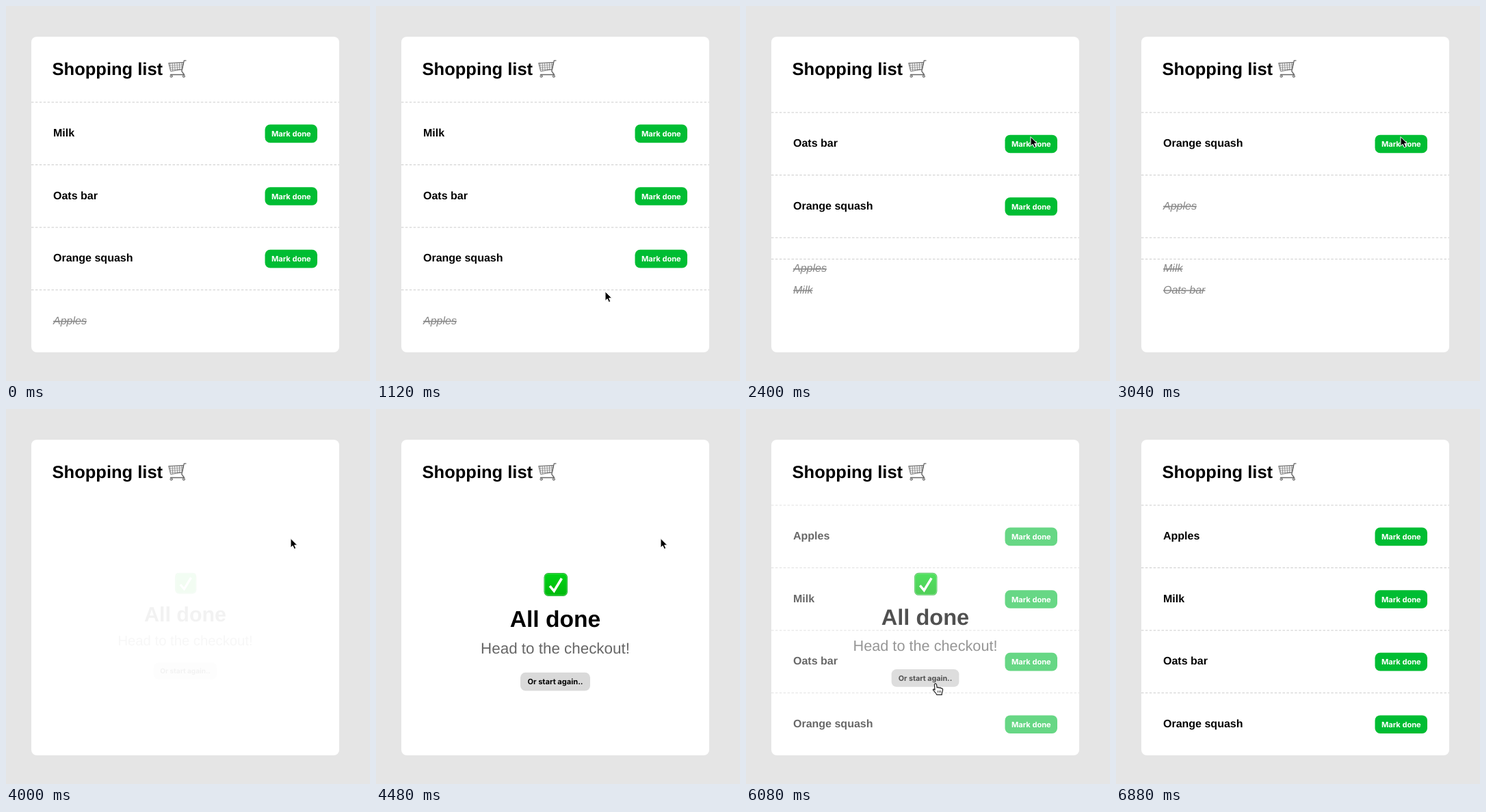
These frames come from a looping animation (532x549 px, 7360 ms). An HTML page:

```html
<!DOCTYPE html>
<html lang="en">
<head>
<meta charset="utf-8">
<title>Shopping list</title>
<style>
  html, body { margin: 0; width: 100%; height: 100%; overflow: hidden; background: #e5e5e5; }
  svg {
    display: block; width: 532px; height: 549px;
    font-family: "Liberation Sans", Arial, sans-serif; text-rendering: geometricPrecision;
  }
  .title { font-size: 25.5px; font-weight: 700; }
  .name { font-size: 16px; font-weight: 700; }
  .checked .name { font-weight: 400; font-style: italic; fill: #888; text-decoration: line-through; }
  .checked .button { display: none; }
  .button rect { fill: #00bd33; }
  .button text { font: 700 11.1px Inter, sans-serif; fill: #fff; }
  .button.hover rect { fill: #00a82d; }
  .rule { stroke: #ccc; stroke-dasharray: 3.5 2.4; }
  .headline { font-size: 33.6px; font-weight: 700; }
  .note { font-size: 22.4px; fill: #666; }
  #restart rect { fill: #d9d9d9; }
  #restart text { fill: #000; }
  #restart.hover rect { fill: #cecece; }
  .mid { text-anchor: middle; }
</style>
</head>
<body>
<svg viewBox="0 0 532 549">
  <defs>
    <linearGradient id="green" x2="0" y2="1">
      <stop stop-color="#00d316"/>
      <stop offset="1" stop-color="#00b80c"/>
    </linearGradient>
    <pattern id="mesh" width="3.4" height="3" patternUnits="userSpaceOnUse" patternTransform="rotate(-3)">
      <path d="M0 0H3.4M0 0V3" stroke="#777" stroke-width="1.4"/>
    </pattern>
  </defs>
  <rect width="532" height="549" fill="#e5e5e5"/>
  <rect x="37" y="45" width="450" height="462" rx="8" fill="#fff"/>
  <text class="title" x="67.6" y="101.3">Shopping list</text>

  <g fill="none" stroke="#777" stroke-linecap="round" stroke-linejoin="round">
    <path fill="url(#mesh)" d="M238 83.5L259.5 82.5L257.3 93L241 95.5Z"/>
    <path stroke="#666" stroke-width="1.3" d="M263 79.8H260.3L256.8 95.5L260.5 100.5H240.5"/>
    <circle cx="241.6" cy="102.8" r="1.7" fill="#bbb"/>
    <circle cx="259.8" cy="102.8" r="1.7" fill="#bbb"/>
  </g>

  <g id="list"></g>

  <g id="finish">
    <rect x="245.5" y="240" width="34.5" height="34" rx="6.5" fill="#079a14"/>
    <rect x="246.6" y="241.1" width="32.3" height="31.8" rx="5.5" fill="url(#green)" stroke="#5be568" stroke-width=".9"/>
    <path d="M254 259.2L260.2 266.4L271.4 248" fill="none" stroke="#fff" stroke-width="3.6"/>
    <text class="headline mid" x="262" y="319">All done</text>
    <text class="note mid" x="262" y="358">Head to the checkout!</text>
    <g id="restart" class="button">
      <rect x="211" y="385.8" width="102" height="26.6" rx="7.5"/>
      <text class="mid" x="262" y="403.3">Or start again..</text>
    </g>
  </g>

  <g id="cursor">
    <path id="arrow" stroke="#fff" d="M0 0V13.6L3.1 10.7L5.3 15.6L7.7 14.6L5.6 9.8H9.8Z"/>
    <g id="hand" stroke="#222" stroke-linejoin="round" stroke-linecap="round">
      <path fill="#fff" stroke-width="1.2" d="M-1 9.4L-1.6 1.6Q-.2-1.6 1.4 1.2L2.2 6Q4 4.4 5.1 6.4
        Q7 5 8.1 7.1Q10.4 6.4 10.6 8.7Q10.6 11 9.3 14L9.2 16.4H1.9Q.5 13.6-3.6 9.4Q-3.4 7-1 9.4Z"/>
      <path fill="none" stroke-width="3" stroke-dasharray=".8 1.4" stroke-linecap="butt" d="M2.8 11.7H8"/>
    </g>
  </g>
</svg>
<script>
  const LOOP = 7360, STEP = 160, ROW = 91.6, TOP = 140.9;
  const FLIP = 400, HOVER = 220, EMPTY = 3484, RESTART = 5866;
  const clickAt = n => 2138 + 640 * n;
  const names = ["Milk", "Oats bar", "Orange squash", "Apples"];
  const last = names.length - 1;
  const $ = id => document.getElementById(id);

  const home = { x: 320, y: 425 };
  const moves = [
    { from: 320, to: 640, x: 335, y: 418 },
    { from: 1280, to: 1920, x: 416, y: 191.5 },
    { from: 3360, to: 3520, x: 416, y: 189.5 },
    { from: 4480, to: 5600, x: 277, y: 402, bend: -110 },
    { from: 6080, to: 6720, x: 317, y: 511 }
  ];

  $("list").innerHTML = names.map(name => `<g>
    <path class="rule" d="M37 0H487"/>
    <text class="name" x="69" y="50.3">${name}</text>
    <g class="button">
      <rect x="378.5" y="32.7" width="76.5" height="26.6" rx="7.5"/>
      <text class="mid" x="416.8" y="50.2">Mark done</text>
    </g></g>`).join("");
  const rows = [...$("list").children];

  const clamp = x => Math.min(1, Math.max(0, x));
  const cubic = x => x < .5 ? 4 * x ** 3 : 1 - 4 * (1 - x) ** 3;
  const sine = x => (1 - Math.cos(Math.PI * x)) / 2;
  const run = (t, start, length, ease = cubic) => ease(clamp((t - start) / length));
  const within = (t, from, to) => t >= from && t < to;
  const show = (el, on) => el.style.display = on ? "" : "none";

  // Each of the first two clicks sends one row to the end and lifts the rest.
  function slot(i, t) {
    if (t >= RESTART) return (i + 1) % names.length;
    return [0, 1].reduce((s, n) => s + run(t, clickAt(n), FLIP) * (i === n ? last : -1), i);
  }

  function cursorAt(t) {
    let { x, y } = home;
    for (const m of moves) {
      const k = run(t, m.from, m.to - m.from, sine);
      x += (m.x - x) * k + (m.bend || 0) * Math.sin(Math.PI * k);
      y += (m.y - y) * k;
    }
    return `translate(${x} ${y})`;
  }

  function draw(t) {
    let hand = false;
    rows.forEach((row, i) => {
      const checked = t < RESTART && (i === last || (i < 2 && t >= clickAt(i)));
      const hover = i < last && within(t, clickAt(i) - HOVER, clickAt(i));
      hand = hand || hover;
      row.setAttribute("transform", `translate(0 ${TOP + ROW * slot(i, t)})`);
      row.classList.toggle("checked", checked);
      row.lastElementChild.classList.toggle("hover", hover);
    });
    $("list").style.opacity = 1 - run(t, EMPTY, FLIP) + run(t, RESTART, FLIP);

    const seen = run(t, EMPTY + FLIP, 500) - run(t, RESTART, 500);
    const again = within(t, 5440, 6400);
    $("finish").style.opacity = seen;
    $("finish").setAttribute("transform", `translate(262 236) scale(${.9 + .1 * seen}) translate(-262 -236)`);
    $("restart").classList.toggle("hover", again);

    hand = hand || again;
    show($("cursor"), within(t, 320, 6880));
    show($("hand"), hand);
    show($("arrow"), !hand);
    $("cursor").setAttribute("transform", cursorAt(t));
  }

  const start = performance.now();
  function tick() {
    const t = (performance.now() - start) % LOOP;
    draw(Math.floor(t / STEP) * STEP);
    requestAnimationFrame(tick);
  }
  tick();
</script>
</body>
</html>
```
